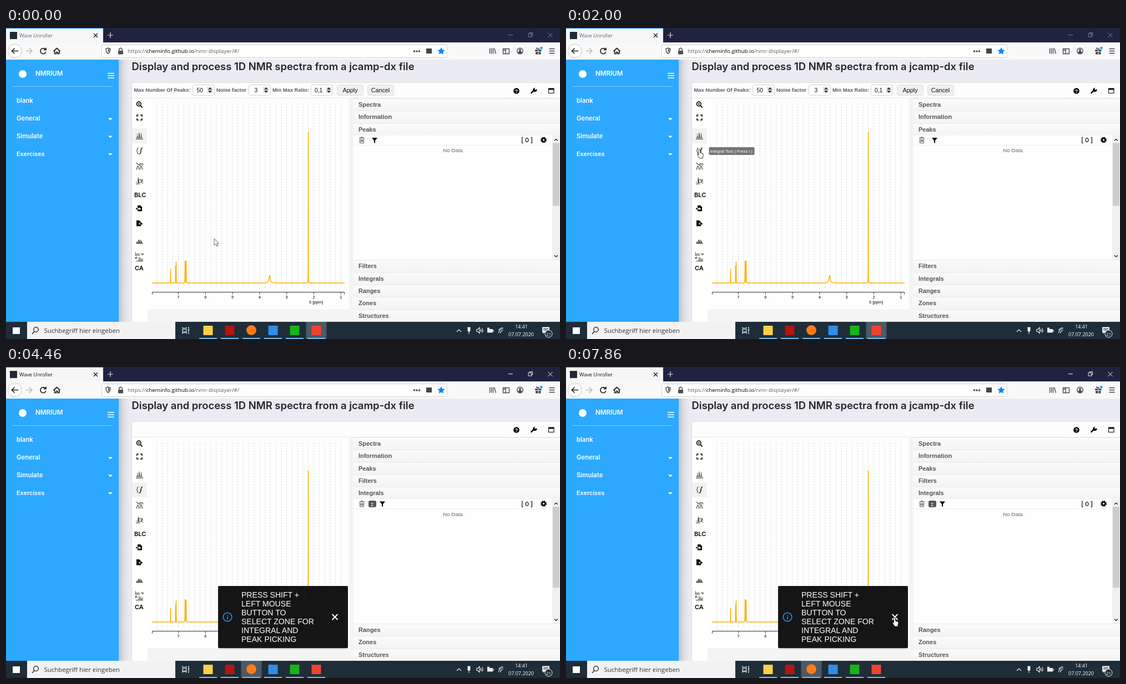
Write an HTML page that moves like this. It is 998 by 561 pixels and loops after 8000 ms.

```html
<!DOCTYPE html>
<html lang="en">
<head>
<meta charset="utf-8">
<title>NMR spectra</title>
<style>
html, body { margin: 0; height: 100%; overflow: hidden; background: #ebecf1 }
#stage { display: block; width: 100vw; height: 100vh }
text { font-family: "Liberation Sans", Arial, sans-serif; white-space: pre }
.m, .m text { font-family: Inter, sans-serif; font-weight: 600 }
.o, .o text { font-family: "Open Sans", sans-serif }
.line { fill: none; stroke: #111; stroke-width: 1.2 }
.grey { stroke: #4a4a4f; stroke-width: 1.4 }
.mid { text-anchor: middle }
.field { fill: #fff; stroke: #d4d4d4 }
.btn { fill: #efefef; stroke: #ddd }
</style>
</head>
<body>
<svg id="stage" viewBox="0 0 998 561">
<defs>
  <linearGradient id="shade"><stop stop-color="#555b70" stop-opacity=".3"/><stop offset=".5" stop-color="#555b70" stop-opacity=".08"/><stop offset="1" stop-color="#555b70" stop-opacity="0"/></linearGradient>
  <linearGradient id="head" x2="0" y2="1"><stop stop-color="#fbfbfb"/><stop offset="1" stop-color="#f3f3f3"/></linearGradient>
</defs>

<!-- browser frame -->
<g class="o">
  <path fill="#202340" d="M0 0h998v27H0z"/>
  <path fill="#f5f6f7" d="M0 0h175v27H0z"/>
  <path fill="#0a84ff" d="M0 0h175v1H0z"/>
  <path fill="#f9f9fa" d="M0 26h998v31H0z"/>
  <path fill="#222b35" d="M7 7h13v13H7z"/>
  <text id="tab" x="24" y="16.7" font-size="9.1">Wave Unroller</text>
  <path class="line" d="m158 10 7 7m0-7-7 7"/>
  <path class="line" style="stroke:#ddd" d="M183 13h10m-5-5v10"/>
  <path id="controls" class="line" style="stroke-width:1" d="M905 12.5h8M941 10.5h5.5v5.5H941zM943 10.5v-2h5.5v5.5h-2M976.5 9l8 8m0-8-8 8"/>
  <circle cx="16" cy="41.5" r="12.5" fill="#fff" stroke="#c4c4c8"/>
  <path class="line" style="stroke-width:1.7;stroke:#222" d="M22 41.5H10.5m5-5-5 5 5 5M71 38.5a5 5 0 1 0 .8 4.5M72 35.5v3.8h-4M85.5 42l6-5.5 6 5.5M87.5 41v5.5h3v-3h2.5v3h3V41"/>
  <path class="line" style="stroke-width:1.5;stroke:#bbb" d="M36 41.5h11m-5-5 5 5-5 5"/>
  <rect class="field" x="172.5" y="30.5" width="622" height="23" rx="2"/>
  <path class="line grey" d="M180 37.5l4-1.5 4 1.5q0 6-4 9-4-3-4-9z"/>
  <path fill="#4a4a4f" d="M184 37.5l2.5 1q0 4-2.5 6z"/>
  <rect x="202" y="41" width="9" height="6.5" rx="1" fill="#4a4a4f"/>
  <path class="line grey" d="M203.700 41v-2a2.8 2.8 0 0 1 5.6 0v2"/>
  <text x="219" y="45" font-size="9.85" fill="#5c5c60">https://<tspan fill="#000">cheminfo.github.io</tspan>/nmr-displayer/#/</text>
  <path fill="#444" d="M734 40.5h3v3h-3zM738.5 40.5h3v3h-3zM743 40.5h3v3h-3zM757 37h10v9h-10z"/>
  <path fill="#0a84ff" d="m784 35 2 4.200 4.600.6-3.300 3.200.8 4.600-4.100-2.200-4.100 2.200.8-4.600-3.300-3.200 4.600-.6z"/>
  <path class="line grey" d="M871.5 36.5v10m3-10v10m3-10v10m2-10 3 10M895.5 37.5h11v9h-11zM900 37.5v9M896 40h4"/>
  <circle class="line grey" cx="926" cy="41.5" r="5.3"/>
  <path fill="#4a4a4f" d="M922.5 45a3.5 3.5 0 0 1 7 0l-3.5 2z"/><circle cx="926" cy="39.8" r="2" fill="#4a4a4f"/>
  <path fill="#4a4a4f" d="M953 39h5.3v3H953zm6.3 0h5.2v3h-5.2zM954 43h4.3v4.5H954zm5.3 0h4.2v4.5h-4.2z"/>
  <path class="line grey" d="M956 38q-1-2 1-2l2 2.5 2-2"/>
  <circle cx="964.5" cy="36" r="2.3" fill="#00a5e8"/>
  <path class="line grey" d="M978.5 37.5h10m-10 4h10m-10 4h10"/>
</g>

<!-- page -->
<path fill="#ebecf1" d="M0 57h998v473H0z"/>
<g class="m" fill="#fff" font-size="11.3">
  <path fill="#2ca8ff" d="M0 57h203v473H0z"/>
  <circle cx="30" cy="83" r="7"/>
  <text x="53" y="86" font-size="11.6">NMRIUM</text>
  <path d="M183 81h12v1.6h-12zm0 4.2h12v1.6h-12zm0 4.2h12V91h-12z"/>
  <path fill="#8fd0ff" d="M12 105h180v1H12z"/>
  <text x="19" y="135">blank</text>
  <text x="19" y="167">General</text><text x="19" y="199">Simulate</text><text x="19" y="230.5" font-size="10.9">Exercises</text>
  <path d="M184 162.5h8l-4 4zm0 32h8l-4 4zm0 31.5h8l-4 4z"/>
</g>
<text class="m" x="226.5" y="76" font-size="18.43" fill="#252529">Display and process 1D NMR spectra from a jcamp-dx file</text>
<path fill="#fff" stroke="#dedee2" d="M226.5 98.5H999V531H226.5z"/>
<path fill="url(#shade)" d="M203 57h20v473h-20z"/>
<path fill="#fdfdfd" d="M227 99h771v27H227z"/>
<path fill="#e8e8e8" d="M227 126h771v1H227z"/>

<g id="options">
  <g font-size="9.35" font-weight="bold" fill="#5c5c5c">
    <text x="230.5" y="115">Max Number Of Peaks:</text><text x="379" y="115">Noise factor</text><text x="480" y="115">Min Max Ratio:</text>
  </g>
  <rect class="field" x="336.5" y="102.5" width="39" height="19" rx="3"/>
  <rect class="field" x="437.5" y="102.5" width="39" height="19" rx="3"/>
  <rect class="field" x="549.5" y="102.5" width="39" height="19" rx="3"/>
  <rect class="btn" x="596.5" y="102.5" width="47" height="19" rx="3"/>
  <rect class="btn" x="651.5" y="102.5" width="47" height="19" rx="3"/>
  <g font-size="10.2" fill="#111">
    <text x="343.5" y="115.7">50</text><text x="447.5" y="115.7">3</text><text x="556" y="115.7">0,1</text>
    <text class="mid" x="620" y="115.7" font-size="10.9">Apply</text><text class="mid" x="674.5" y="115.7" font-size="10.7">Cancel</text>
  </g>
  <path fill="#e6e6e6" d="M362 106h11v12h-11zm101 0h11v12h-11zm113 0h11v12h-11z"/>
  <path fill="#333" d="M364 111h7l-3.5-4zm0 2h7l-3.5 4zM465 111h7l-3.5-4zm0 2h7l-3.5 4zM578 111h7l-3.5-4zm0 2h7l-3.5 4z"/>
</g>
<circle cx="919.5" cy="113.5" r="5.3"/>
<text class="mid" x="919.5" y="116.8" font-size="9" font-weight="bold" fill="#fff">?</text>
<path d="m946.5 117 5-5" stroke="#111" stroke-width="2.6" stroke-linecap="round"/>
<path d="M956.5 110.5a3.7 3.7 0 1 1-3.5-2.7l-1 2.2 1.5 1.5z"/>
<path d="M977 108.5h10.5v9.5H977zm1 3v5.5h8.5v-5.5z" fill-rule="evenodd"/>

<!-- tool column -->
<path id="active" fill="#f2f2f2" d="M227 181h27v27h-27z"/>
<g class="line">
  <circle cx="239.3" cy="137" r="3.8" stroke-width="1.7"/><path stroke-width="2" d="m242 140 3.5 3.5"/><path d="M237.5 137h3.6m-1.8-1.8v3.6"/>
  <path stroke-width="1.7" d="M236 160v-3h3m3 0h3v3m0 3v3h-3m-3 0h-3v-3"/>
  <g stroke-width=".8">
    <path d="M234 200.500h13M234.500 198.500h1.500l.7-4 .7 4h1.800l.8-8 .8 8h2l.7-6 .7 6h2M236.700 191v2m3.300-4.500v1.500m3.500 0v2"/>
    <path d="m234 243 5 4 3-3M236 244l6 5M234 254.5h2v-4h3v4h3v-4h3v4h2M237.5 248v2.5m6-2.500v2.500"/>
    <path d="M234 281.500h3.500l.8-11 .8 11h2M234 279l2-1.500M244 278l3 3m-1-9v5m-4-1h3"/><circle cx="242" cy="276" r="3"/>
    <path d="M234 388.5h13M235.500 388l.8-3 .8 3h1l.8-6 .8 6h1l.8-6 .8 6h1l.8-4 .8 4"/>
    <path d="m243 406 4 3m-3 0h3v-3M237 416l-4-2m3-1-3 1 1 3M234 420.500h13"/>
  </g>
  <path stroke-width="1" d="M238.500 216q-1.800 0-1.800 2.800 0 2.300-1.500 2.700 1.500.4 1.500 2.700 0 2.800 1.800 2.800"/>
  <path stroke-width="1.500" d="M239.800 227q2.300.7 2.800-3l.7-4.500q.6-3.700 2.500-3"/>
</g>
<path d="M237 320h5l3 3v7.500h-8V327h3v1.8l3.300-2.800-3.300-2.800v1.600h-3zM234 324.800h3v2.200h-3zM235 347h5l3 3v1.500h-3.500v3h3.500v3h-8zM241 352.2h2.200v-1.700l3 2.6-3 2.6v-1.700H241z"/>
<g font-size="8"><text x="232" y="411" style="font-family:'Liberation Serif',serif">Im</text><text x="238.5" y="420" style="font-family:'Liberation Serif',serif">Re</text></g>
<text x="241" y="248" font-size="7.5" font-style="italic">m</text>
<g class="m" font-size="11"><text x="231" y="304.5">BLC</text><text x="232" y="437">CA</text></g>

<!-- chart -->
<path fill="#f4f4f4" d="M255 127h371v403H255z"/>
<path fill="#fefefe" d="M255 127h363v380H255z"/>
<g id="axis"></g>
<path id="spectrum" fill="none" stroke="#ffb000" stroke-width="1.5" stroke-linejoin="round"/>
<g id="target" class="line" style="stroke-width:1"><circle r="8"/><path d="M-8 0H8M0-8V8"/></g>
<g id="readout" class="m" font-size="8.3" fill="#444"></g>
<text id="label" class="m mid" font-size="10.6" style="font-weight:500"></text>

<!-- side panel -->
<path fill="#fdfdfd" d="M626 127h372v403H626z"/>
<g id="panel"></g>

<g id="tip">
  <rect x="257.5" y="215" width="82" height="14" rx="2" fill="#757575"/>
  <text x="260" y="224.9" font-size="7.65" fill="#fff">integral Tool ( Press i )</text>
</g>
<g id="toast">
  <rect x="383" y="397" width="233" height="112" rx="3" opacity=".15"/>
  <rect x="382" y="395" width="234" height="112" rx="2" fill="#151515"/>
  <circle cx="399" cy="451" r="7.8" fill="none" stroke="#2e9afe" stroke-width="1.5"/>
  <path fill="#2e9afe" d="M398.2 450h1.6v5h-1.6zM398.2 447h1.6v1.6h-1.6z"/>
  <path stroke="#fff" stroke-width="1.8" d="m587.5 446 10 10m0-10-10 10"/>
</g>

<!-- taskbar -->
<g class="o">
  <path fill="#1e2d38" d="M0 530h998v31H0z"/>
  <path fill="#fff" d="M12 540h13v12H12z"/>
  <path fill="#f2f2f2" d="M38 530h267v31H38z"/>
  <circle class="line" cx="54" cy="544" r="4.3"/><path class="line" d="m51 547.5-4 4.5"/>
  <text x="68.5" y="550" font-size="11.4" fill="#333">Suchbegriff hier eingeben</text>
  <path class="line" style="stroke:#eee" d="M318 539.5v2h7v-2m-7 12v-2h7v2M318 543.5h7v4.5h-7zM329 539v13M328 544.5h2.5"/>
  <g id="apps"></g>
  <g class="line" style="stroke:#eee">
    <path d="m812 548 4-4 4 4M848 543.5h2l3-3v10l-3-3h-2zM855 543q2 2.5 0 5M857.5 541.5q3 4 0 8"/>
    <path d="M887.5 550.5a8 8 0 0 1 8-8m-5 8a5 5 0 0 1 5-5m-8-.5a11 11 0 0 1 8-4.5"/>
  </g>
  <path fill="#eee" d="M831.5 539.5h5v7q-2.5 3-5 0zM833.5 548h1v4h-1zM867 543h10v6.5H867zM877.5 545h1.5v2.5h-1.5zM867 540.5h4v4h-4zM966 539.5h13v10h-9l-2 2.5v-2.5h-2z"/>
  <path stroke="#1e2d38" d="M968 542.5h9m-9 2.500h9"/>
  <circle cx="977.5" cy="551.5" r="6.5" fill="#1e2d38" stroke="#eee"/>
  <g class="mid" fill="#fff" font-size="9"><text x="928.5" y="542" font-size="8.8">14:41</text><text x="928" y="556">07.07.2020</text><text x="977.5" y="554.5" font-size="8">21</text></g>
</g>

<path id="arrow" fill="#fff" stroke="#444" stroke-width=".8" d="M0 0v12l2.800-2.500 2 4.400 2-.9-2-4.300h3.700z"/>
<path id="hand" fill="#fff" stroke="#222" stroke-width=".9" d="M-1.500 1.200a1.500 1.500 0 0 1 3 0v5l4 1q1.600.5 1.300 2.300l-.9 4.500v2H.3l-4-6q-.3-1.700 1-1.200l1.200 1z"/>
<path id="beam" fill="none" stroke="#222" d="M-2.500-8h5m-5 16h5M0-8V8"/>
</svg>

<script>
const $ = id => document.getElementById(id);
const show = (id, on) => $(id).style.display = on ? '' : 'none';
const move = (id, x, y) => $(id).setAttribute('transform', `translate(${x} ${y})`);
const clamp = u => Math.min(1, Math.max(0, u));
const span = (t, from, to) => clamp((t - from) / (to - from));
const easeOut = u => 1 - (1 - u) ** 2;

// axis and grid
const PPM = 48.8, BASE = 460;
let axis = '<path class="line" style="stroke:#333;stroke-width:1" d="M263.5 480.5v-4h346v4"/>';
for (let x = 271.4; x < 610; x += PPM / 5)
  axis += `<path d="M${x} 136V472" stroke="#dcdcdc" stroke-width=".9" stroke-dasharray="3 2"/>`;
for (let n = 1; n < 8; n++) {
  const x = 310.5 + (7 - n) * PPM;
  axis += `<path d="M${x} 476.5v4" stroke="#333"/><text class="mid" x="${x}" y="488" font-size="7.5">${n}</text>`;
}
$('axis').innerHTML = axis + '<text class="mid" x="558.5" y="497" font-size="7.5">δ [ppm]</text>';

// Lorentzian peaks: centre, height, half width
const peaks = [[296.5, 25, .08], [305.5, 30, .08], [306.5, 38, .1], [322.5, 40, .1], [323.5, 37, .1], [324.5, 39, .1], [475, 14, 1.3], [544.5, 273, .08]];
let curve = '';
for (let x = 263; x <= 610; x += .25) {
  const h = peaks.reduce((sum, [c, a, w]) => sum + a / (1 + ((x - c) / w) ** 2), 0);
  curve += `${curve ? 'L' : 'M'}${x} ${(BASE - h).toFixed(2)}`;
}
$('spectrum').setAttribute('d', curve);

// accordion
const ROW = 22.3, OPEN = 224.5;
const heads = ['Spectra', 'Information', 'Peaks', 'Filters', 'Integrals', 'Ranges', 'Zones', 'Structures'];
const bodies = { Peaks: 347, Integrals: 270 };
const sum = '<rect x="27" y="2.5" width="14" height="12" rx="3" fill="#555"/><text class="mid" x="34" y="12" font-size="9" fill="#fff">Σ</text>';
const body = name => {
  const fx = name == 'Peaks' ? 33 : 47;
  return `<svg id="${name}" x="626" width="372"><path fill="#fefefe" d="M0 0h372v230H0z"/>
    <path class="line" style="stroke:#555;stroke-width:1" d="M10.5 4.5h9m-6 0v-1.5h3v1.5M11.5 5v8.5h7V5M13.5 7v4.5m1.5-4.5v4.5m1.5-4.5v4.5"/>
    ${name == 'Peaks' ? '' : sum}<path d="M${fx} 4h10l-4 5v5l-2-1.5V9z"/>
    <text class="m" x="302" y="12.5" font-size="11" style="font-weight:500">[ 0 ]</text>
    <circle cx="342.5" cy="8" r="3" fill="none" stroke="#000" stroke-width="2.6"/><circle cx="342.5" cy="8" r="4.7" fill="none" stroke="#000" stroke-width="1.7" stroke-dasharray="2 1.69"/>
    <path fill="#eee" d="M0 17h358v1H0z"/>
    <text class="mid" x="179" y="30" font-size="9.7" fill="#666">No Data</text>
    <path fill="#f0f0f0" d="M358 0h14v230h-14z"/><rect class="thumb" x="359" y="13.5" width="12" fill="#cdcdcd"/>
    <path class="line" d="m362 9.5 3-3 3 3"/><path class="line down" d="m362-1.5 3 3 3-3"/></svg>`;
};
$('panel').innerHTML = heads.map((name, i) => `<g id="head${i}"><rect x="626" width="372" height="${ROW}" fill="url(#head)"/>
  <path fill="#e4e4e4" d="M626 0h372v.8H626z"/><text x="635" y="15" font-size="10.95" font-weight="bold" fill="#555">${name}</text></g>
  ${bodies[name] ? body(name) : ''}`).join('');

function layout(heights) {
  let y = 127;
  heads.forEach((name, i) => {
    move('head' + i, 0, y);
    y += ROW;
    if (!bodies[name]) return;
    const h = heights[name], box = $(name), track = Math.max(0, h - 26);
    box.setAttribute('y', y);
    box.setAttribute('height', h);
    box.style.display = h > .5 ? '' : 'none';
    box.querySelector('.thumb').setAttribute('height', track ** 2 / bodies[name]);
    box.querySelector('.down').setAttribute('transform', `translate(0 ${h - 7})`);
    y += h;
  });
}

['PRESS SHIFT +', 'LEFT MOUSE', 'BUTTON TO', 'SELECT ZONE FOR', 'INTEGRAL AND', 'PEAK PICKING'].forEach((line, i) =>
  $('toast').innerHTML += `<text x="424" y="${415.5 + i * 16.15}" font-size="14.05" fill="#fff">${line}</text>`);

$('apps').innerHTML = '<path id="focus" fill="#4a5b67" d="M-18.5 530h37v31h-37z"/>' +
  ['#ffcf48', '#b3150f', '#ff7a1a', '#2f8fe8', '#18b418', '#f0432f'].map((fill, i) => {
    const x = 364 + i * 39;
    const mark = i == 2 ? `<circle cx="${x}" cy="545" r="9"` : `<rect x="${x - 8.5}" y="537" width="17" height="17"`;
    return `${mark} fill="${fill}"/><path fill="#76b9ed" d="M${x - 16} 559h32v2h-32z"/>`;
  }).join('');

// pointer path: time, x, y
const path = [[0, 375, 380], [660, 375, 380], [1000, 340, 300], [1400, 289, 216], [1500, 280, 214], [1720, 250, 213],
  [2000, 240.5, 219], [3560, 240.5, 219], [3760, 256.5, 228], [3860, 275, 312], [4100, 400, 352], [4350, 544, 385],
  [4530, 533, 418], [5060, 533, 418], [5660, 521, 412], [5860, 484, 426], [5900, 476, 428], [6050, 474, 430],
  [6400, 557, 428], [7160, 557, 428], [7630, 592, 455], [7840, 592, 455], [7860, 592, 452], [8000, 592, 452]];
const STEP = 20;
function pointer(time) {
  const t = Math.max(0, Math.floor(time / STEP) * STEP);
  const i = Math.max(1, path.findIndex(k => k[0] >= t));
  const [a, b] = [path[i - 1], path[i]], u = span(t, a[0], b[0]);
  return [a[1] + (b[1] - a[1]) * u, a[2] + (b[2] - a[2]) * u];
}

const value = (x, name, num, unit = '') =>
  `<text x="${x}" y="521">${name} :<tspan font-size="10.3" font-weight="700" fill="#8b0015">${num}</tspan><tspan font-size="9" fill="#8b0015">${unit}</tspan></text>`;

function draw(t) {
  const [x, y] = pointer(t), [lx, ly] = pointer(t - 100);
  const clicked = t >= 3030, toast = easeOut(span(t, 3500, 3700));
  const overToast = toast > 0 && x > 382 && y > 395;

  $('tab').setAttribute('fill', clicked ? '#111' : '#666');
  $('controls').style.stroke = clicked ? '#eee' : '#83859a';
  move('focus', clicked ? 442 : 559, 0);
  move('active', 0, clicked ? 27 : 0);
  show('options', t < 3060);
  layout({ Peaks: OPEN * (1 - easeOut(span(t, 3060, 3360))), Integrals: OPEN * easeOut(span(t, 3100, 3490)) });

  $('tip').style.opacity = t < 3800 ? span(t, 1800, 1980) : 0;
  $('toast').style.opacity = toast;
  $('toast').setAttribute('transform', `translate(499 451) scale(${toast}) translate(-499 -451)`);

  const reading = t >= 60 && x > 258 && !overToast;
  show('readout', reading);
  show('target', reading && !clicked);
  show('label', reading && !clicked);
  if (reading) {
    const ppm = 7 - (lx - 310.35) / PPM;
    $('readout').innerHTML = value(268, 'X', ppm.toFixed(5), 'ppm') + value(354, 'X', (ppm * 600.1341).toFixed(2), 'Hz') +
      value(436.5, 'Y', ((BASE - ly) * 1976102.88058).toFixed(2));
    $('label').textContent = ppm.toFixed(2);
    move('label', x - 1, y);
    const near = peaks.filter(p => Math.abs(p[0] - lx) < 10).sort((a, b) => b[1] - a[1])[0] || [lx, 0];
    move('target', near[0], BASE - near[1]);
  }

  const kind = x < 258 || x > 584 ? 'hand' : overToast && x < 556 ? 'beam' : 'arrow';
  for (const id of ['arrow', 'hand', 'beam']) show(id, id == kind);
  move(kind, x, y);
}

const start = performance.now();
(function tick() {
  draw((performance.now() - start) % 8000);
  requestAnimationFrame(tick);
})();
</script>
</body>
</html>
```
